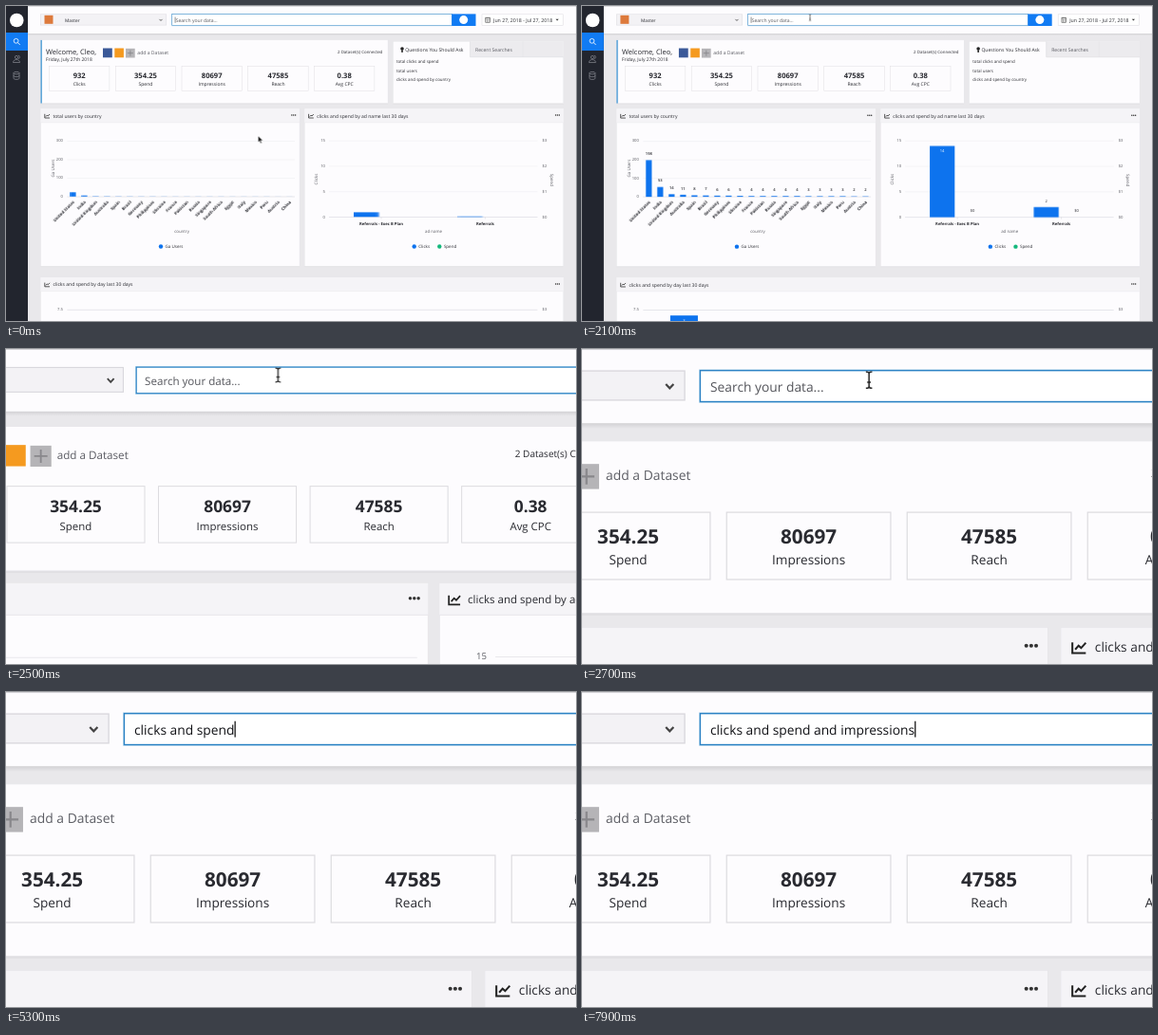
Recreate the animation shown at these times as an HTML page. Size 600 px wide and 332 px high, loop 8000 ms.

```html
<!DOCTYPE html>
<html lang="en">
<head>
<meta charset="utf-8">
<title>Dashboard search</title>
<style>
  html, body { margin: 0; width: 100%; height: 100%; overflow: hidden; background: #e9e8eb; }
  svg { display: block; width: 600px; height: 332px; }
  text { font-family: "Open Sans", "Noto Sans", sans-serif; font-weight: 450; fill: #292a30; white-space: pre; text-rendering: geometricPrecision; }

  #view, .grow, .late, #pointer, #arrow, #beam { animation: 8s linear infinite; }
  #view { transform-origin: 204px .5px; animation-name: zoom; }
  .grow { animation-name: grow; }
  .grow.slow { animation-name: growSlow; }
  .late { animation-name: appear; }
  #pointer { animation-name: travel; }
  #arrow { animation-name: arrow; animation-timing-function: step-end; }
  #beam { animation-name: beam; animation-timing-function: step-end; }

  @keyframes zoom {
    0% { transform: scale(1); }
    26.18% { transform: scale(1); animation-timing-function: cubic-bezier(.333, 0, .667, 1); }
    33.75%, 100% { transform: scale(2.724); }
  }
  @keyframes grow {
    0% { transform: scaleY(.12); animation-timing-function: cubic-bezier(.35, .31, .62, 1); }
    9.75%, 100% { transform: scaleY(1); }
  }
  @keyframes growSlow {
    0% { transform: scaleY(.067); animation-timing-function: cubic-bezier(.35, .25, .62, 1); }
    10.4%, 100% { transform: scaleY(1); }
  }
  @keyframes appear { 0%, 9.75% { opacity: 0; } 12%, 100% { opacity: 1; } }
  @keyframes travel {
    0%, 2.5% { transform: translate(265.5px, 137px); }
    12.5% { transform: translate(273px, 51px); }
    20%, 100% { transform: translate(240px, 12.3px); }
  }
  @keyframes arrow { 0% { opacity: 1; } 18.3%, 100% { opacity: 0; } }
  @keyframes beam { 0% { opacity: 0; } 18.3% { opacity: 1; } 41.25%, 100% { opacity: 0; } }
</style>
</head>
<body>
<svg viewBox="0 0 600 332">
  <defs>
    <linearGradient id="shade" x2="0" y2="1">
      <stop stop-color="#000" stop-opacity=".1"/>
      <stop offset="1" stop-color="#000" stop-opacity="0"/>
    </linearGradient>
  </defs>
  <g id="view">
    <g id="page"></g>
    <text id="query" x="178.7" y="16.7" font-size="5.07"></text>
    <rect id="caret" y="11.6" width=".5" height="6.2" fill="#222"/>
    <g id="pointer">
      <path id="arrow" d="M0 0V6.6L1.5 5.2L2.6 7.7L3.7 7.2L2.6 4.8H4.7Z" fill="#111" stroke="#fff" stroke-width=".4"/>
      <path id="beam" d="M-1.2-3.2Q0-3.2 0-2.4Q0-3.2 1.2-3.2M0-2.4V2.4M-1.2 3.2Q0 3.2 0 2.4Q0 3.2 1.2 3.2M-.7 .9H.7" fill="none" stroke="#222" stroke-width=".55"/>
    </g>
  </g>
</svg>
<script>
const BLUE = '#0d73ee', GREEN = '#14b87c', GREY = '#5c5d64', LINE = '#e4e3e7';
const parts = [];
const add = s => parts.push(s);

const rect = (x, y, w, h, fill, extra = '') =>
  add(`<rect x="${x}" y="${y}" width="${w}" height="${h}" fill="${fill}" ${extra}/>`);
const frame = (x, y, w, h, fill, stroke = LINE, sw = .5, extra = '') =>
  rect(x, y, w, h, fill, `stroke="${stroke}" stroke-width="${sw}" ${extra}`);
const circle = (x, y, r, fill) => add(`<circle cx="${x}" cy="${y}" r="${r}" fill="${fill}"/>`);
const stroke = (d, color, w = .5) =>
  add(`<path d="${d}" fill="none" stroke="${color}" stroke-width="${w}"/>`);
const text = (x, y, str, size = 5, extra = '') =>
  add(`<text x="${x}" y="${y}" font-size="${size}" ${extra}>${str}</text>`);
const mid = (x, y, str, size, extra = '') => text(x, y, str, size, 'text-anchor="middle" ' + extra);
const tone = c => `style="fill:${c}"`;
const weight = w => `style="font-weight:${w}"`;

// A bar that grows up from its baseline
const bar = (x, base, w, h, cls) =>
  rect(x, base - h, w, h, BLUE, `class="grow ${cls}" style="transform-origin:0 ${base}px"`);

function card(x, y, w, h) {
  rect(x, y + .6, w, h + .3, 'rgba(0,0,0,.04)');
  frame(x, y, w, h, '#fdfcfe', '#e5e4e8', .3);
}

function panel(x, y, w, h, title) {
  card(x, y, w, h);
  rect(x, y, w, 14.6, '#f5f4f7');
  stroke(`M${x} ${y + 14.6}h${w}`, LINE, .4);
  stroke(`M${x + 4.3} ${y + 5.6}v4.2h5.2M${x + 5.4} ${y + 8.4}l1.3-1.5 1 .9 1.8-2`, '#222', .75);
  text(x + 13, y + 9.4, title, 5.05);
  for (let i = 0; i < 3; i++) circle(x + w - 8.2 + i * 1.9, y + 6.9, .75, '#333');
}

function axis(x, y, step, labels, anchor) {
  labels.forEach((s, i) =>
    text(x, y + i * step + 1.1, s, 4.2, `text-anchor="${anchor}" ${tone(GREY)}`));
}

function grid(x1, x2, y, step, rows) {
  for (let i = 0; i < rows; i++)
    stroke(`M${x1} ${y + i * step}H${x2}`, i === rows - 1 ? '#c9cad2' : '#e9e8ec', .45);
}

function turned(x, y, angle, str, size, extra) {
  text(0, 0, str, size, `transform="translate(${x} ${y}) rotate(${angle})" ${extra}`);
}

function legend(x, y, color, str) {
  circle(x, y, 2.2, color);
  text(x + 4.6, y + 1.7, str, 4.5);
}

function header() {
  rect(23, 0, 577, 332, '#e9e8eb');
  rect(23, 29, 577, 2.2, 'url(#shade)');
  rect(23, 0, 577, 29, '#fdfcfe');
  rect(0, 0, 600, .7, '#d3d2d6');
  frame(36.5, 8.8, 132.3, 11.3, '#f3f2f5', '#d9d8dd');
  rect(40.5, 9.8, 9, 9, '#dd7a3c');
  text(62, 16.5, 'Master', 4.8);
  stroke('M161.5 13.9l1.5 1.6 1.5-1.6', '#444', .8);
  frame(174.8, 8.65, 294.6, 12.05, '#fff', '#b9d8ee', 1);
  frame(174.8, 8.65, 294.6, 12.05, '#fff', '#2b82c4', .5);
  rect(469.2, 8.4, 25.3, 12.6, '#117bf3');
  circle(481.7, 14.6, 4.5, '#fff');
  frame(501, 8.8, 85.5, 11.5, '#fff', '#d9d8dd');
  frame(504.8, 12.6, 4.6, 4.6, 'none', '#444', .6);
  stroke('M504.8 14h4.6M506.2 11.6v1.4M508 11.6v1.4M506.3 14v3.2M507.9 14v3.2', '#444', .4);
  text(513, 16.5, 'Jun 27, 2018 - Jul 27, 2018', 5.25);
  add('<path d="M578.6 13.8h3.2l-1.6 1.8z" fill="#333"/>');
}

function sidebar() {
  rect(0, 0, 23, 332, '#22252e');
  circle(11.3, 15, 7.3, '#fff');
  rect(0, 28, 23, 19, '#117bf3');
  add('<circle cx="10.6" cy="36.8" r="2.4" fill="none" stroke="#fff" stroke-width=".8"/>');
  stroke('M12.4 38.6l2.3 2.3', '#fff', .9);
  add('<circle cx="11" cy="54" r="1.6" fill="none" stroke="#9a9ca4" stroke-width=".6"/>');
  stroke('M7.5 59.5c0-4 7-4 7 0zM12.8 52.2a1.6 1.6 0 0 1 0 3.3', '#9a9ca4', .6);
  add('<ellipse cx="11" cy="70.6" rx="3" ry="1.2" fill="none" stroke="#9a9ca4" stroke-width=".6"/>');
  stroke('M8 70.6v5.6c0 1.6 6 1.6 6 0v-5.6M8 73.4c0 1.6 6 1.6 6 0', '#9a9ca4', .6);
}

function summary() {
  card(36.5, 35.9, 365.5, 66.6);
  rect(36.5, 35.9, 1.3, 66.6, '#3f94d2');
  text(42, 50.7, 'Welcome, Cleo,', 7.5);
  text(42, 58.3, 'Friday, July 27th 2018', 4.95);
  rect(102, 44.5, 9.8, 9.8, '#3b5998');
  rect(114.3, 44.5, 9.6, 9.8, '#f59a1f');
  rect(126, 44.8, 9.7, 9.7, '#b5b4b7');
  stroke('M130.85 46.6v6.1M127.8 49.65h6.1', '#88878b', .8);
  text(138.3, 50.9, 'add a Dataset', 5.1, tone(GREY));
  text(349, 50, '2 Dataset(s) Connected', 4.4);
  [['932', 'Clicks'], ['354.25', 'Spend'], ['80697', 'Impressions'], ['47585', 'Reach'], ['0.38', 'Avg CPC']]
    .forEach(([value, label], i) => {
      const x = 45.5 + i * 69.75;
      frame(x, 63.5, 63.4, 26, '#fdfcfe', '#dddce0', .45);
      mid(x + 31.7, 75.5, value, 7.6, weight(700));
      mid(x + 31.7, 83.6, label, 5);
    });
}

function questions() {
  card(407.4, 37.4, 179.4, 65.2);
  rect(488.5, 37.4, 98.3, 16.4, '#ecebee');
  stroke('M488.5 37.4v16.4H586.8', '#d9d8dd', .5);
  stroke('M544 37.4v16.4', '#dfdee2', .4);
  circle(417, 45, 1.8, '#222');
  rect(416.2, 46.3, 1.6, 2.6, '#222');
  text(420.3, 47.7, 'Questions You Should Ask', 5.05);
  text(494, 47.7, 'Recent Searches', 5.1, tone(GREY));
  ['total clicks and spend', 'total users', 'clicks and spend by country']
    .forEach((s, i) => text(411, 60 + i * 9.65, s, 4.45));
}

function countryChart() {
  panel(36.5, 108.2, 272.5, 166, 'total users by country');
  grid(64.4, 304, 142.5, 19.5, 4);
  axis(60, 142.3, 19.5, [300, 200, 100, 0], 'end');
  turned(51.3, 171, -90, 'Ga Users', 4.5, 'text-anchor="middle" ' + tone(GREY));
  const names = ('United States,India,United Kingdom,Australia,Spain,Brazil,Germany,Philippines,Ukraine,France,' +
    'Pakistan,Russia,Singapore,South Africa,Egypt,Italy,Mexico,Peru,Austria,China').split(',');
  const users = [198, 53, 14, 11, 8, 7, 6, 6, 5, 4, 4, 4, 4, 4, 3, 3, 3, 3, 2, 2];
  users.forEach((n, i) => {
    const x = 70.4 + i * 12, h = n * .195;
    bar(x - 3.1, 201, 6.2, h, '');
    mid(x, 195.6 - h, n, 4.1, 'class="late" ' + weight(600));
    turned(x + 2, 207, -45, names[i], 4.4, 'text-anchor="end" ' + weight(700));
  });
  mid(185, 239.3, 'country', 4.4, tone(GREY));
  legend(163, 253.5, BLUE, 'Ga Users');
}

function adChart() {
  panel(314.3, 108.2, 272.5, 166, 'clicks and spend by ad name last 30 days');
  grid(340, 559.5, 142.1, 26.8, 4);
  axis(336, 142, 26.8, [15, 10, 5, 0], 'end');
  axis(564.5, 142, 26.8, ['$3', '$2', '$1', '$0'], 'start');
  turned(327.8, 182.5, -90, 'Clicks', 4.5, 'text-anchor="middle" ' + tone(GREY));
  turned(573, 183.5, 90, 'Spend', 4.5, 'text-anchor="middle" ' + tone(GREY));
  [[395, 14, 'Referrals - Exec B Plan'], [504.4, 2, 'Referrals']].forEach(([x, n, name]) => {
    const h = n * 5.36;
    bar(x - 29, 222.5, 26.2, h, 'slow');
    if (n > 5) mid(x - 16, 228.5 - h, n, 4.1, `class="late" ${tone('#fff')}`);
    else mid(x - 16, 218 - h, n, 4.1, 'class="late"');
    mid(x + 16, 217, '$0', 4.1, 'class="late"');
    mid(x, 230.6, name, 4.2, weight(700));
    stroke(`M${x} 222.5v2`, '#c9cad2', .4);
  });
  mid(450, 239.3, 'ad name', 4.4, tone(GREY));
  legend(429.7, 253.5, BLUE, 'Clicks');
  legend(456.3, 253.5, GREEN, 'Spend');
}

function dayChart() {
  panel(36.5, 286, 550.3, 160, 'clicks and spend by day last 30 days');
  grid(64.4, 559.5, 320.3, 0, 1);
  axis(60, 320, 0, ['7.5'], 'end');
  axis(564.5, 320, 0, ['$3'], 'start');
  bar(93, 400, 29, 74, 'slow');
  mid(107.5, 332.5, '3', 4.1, `class="late" ${tone('#fff')}`);
}

[header, summary, questions, countryChart, adChart, dayChart, sidebar].forEach(draw => draw());
document.getElementById('page').innerHTML = parts.join('');

// Typing: the tenth of a second at which each letter lands
const PHRASE = 'clicks and spend and impressions';
const KEYS = [33, 34, 35, 36, 37, 38, 39, 40, 41, 42, 42, 44, 48, 50, 52, 53, 55, 56, 58, 59, 60,
  63, 64, 66, 68, 69, 73, 74, 75, 76, 77, 79];
const query = document.getElementById('query'), caret = document.getElementById('caret');
let start, shown = -1;

function tick(now) {
  start ??= now;
  const t = (now - start) % 8000;
  const count = KEYS.filter(k => t >= k * 100 - 8).length;
  if (count !== shown) {
    shown = count;
    query.textContent = count ? PHRASE.slice(0, count) : 'Search your data...';
    query.style.fill = count ? '#111216' : '#55565c';
    caret.setAttribute('x', 178.5 + (count ? query.getComputedTextLength() + .2 : -.7));
  }
  caret.style.opacity = count || t % 1000 < 500 ? 1 : 0;
  requestAnimationFrame(tick);
}
requestAnimationFrame(tick);
</script>
</body>
</html>
```
